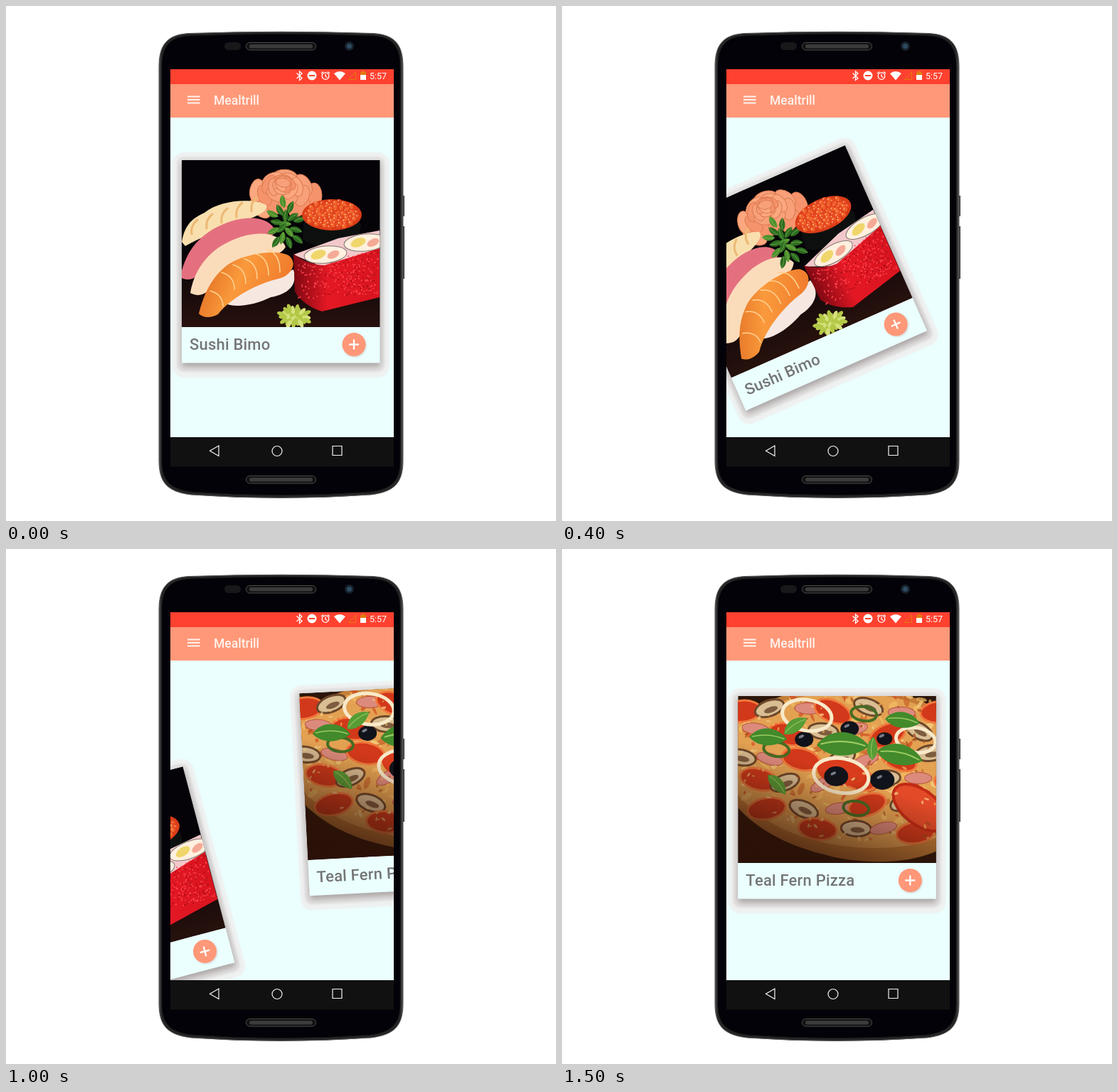
Recreate the animation shown at these times as an HTML page. Size 773 by 725 pixels, loop 2500 ms.

```html
<!DOCTYPE html>
<html lang="en">
<head>
<meta charset="utf-8">
<title>Meal cards</title>
<style>
  html, body { margin: 0; width: 100%; height: 100%; overflow: hidden; background: #fff; }
  body > svg { display: block; width: 100%; height: 100%; }
  text { font-family: Roboto, sans-serif; font-weight: 500; }
  .name { font-size: 22px; letter-spacing: .2px; fill: #757575; }
</style>
</head>
<body>
<svg viewBox="0 0 773 725">
  <defs>
    <linearGradient id="rim">
      <stop offset="0" stop-color="#4a4a4a"/><stop offset=".012" stop-color="#252525"/>
      <stop offset=".988" stop-color="#252525"/><stop offset="1" stop-color="#505050"/>
    </linearGradient>
    <linearGradient id="table" x2="0" y2="1">
      <stop offset=".5" stop-color="#050308"/><stop offset="1" stop-color="#27110d"/>
    </linearGradient>
    <linearGradient id="salmon" x2="1" y2=".3">
      <stop offset="0" stop-color="#d9601c"/><stop offset=".5" stop-color="#fa9a3c"/><stop offset="1" stop-color="#f07a2c"/>
    </linearGradient>
    <linearGradient id="roll">
      <stop offset="0" stop-color="#7c0812"/><stop offset=".4" stop-color="#e41824"/><stop offset="1" stop-color="#d8141f"/>
    </linearGradient>
    <linearGradient id="shade" x1=".6" y1=".5" x2=".4" y2="1">
      <stop offset="0" stop-color="#2a1006" stop-opacity="0"/><stop offset="1" stop-color="#2a1006" stop-opacity=".75"/>
    </linearGradient>
    <filter id="soft" x="-20%" y="-20%" width="140%" height="140%"><feGaussianBlur stdDeviation="4"/></filter>
    <filter id="edge"><feGaussianBlur stdDeviation="1"/></filter>
    <clipPath id="screen"><path d="M231 157H545V607H231Z"/></clipPath>
    <g id="base">
      <rect x="-13" y="-11" width="305" height="317" rx="16" fill="#eff0f0" filter="url(#edge)"/>
      <rect x="-7" y="-5" width="292" height="303" rx="10" fill="#e4e2e2" filter="url(#edge)"/>
      <rect y="4" width="279" height="287" fill="#8c8484" opacity=".65" filter="url(#soft)"/>
      <rect width="278.500" height="285.500" fill="#ebffff"/>
      <circle cx="243" cy="261" r="16.500" fill="#c9bdba" opacity=".6" filter="url(#edge)"/>
      <circle cx="242" cy="259.500" r="16.500" fill="#ff9878"/>
      <path d="M235 259.500H249M242 252.500V266.500" stroke="#fff" stroke-width="2.300"/>
    </g>
    <g id="speaker">
      <rect x="337.500" y="51.500" width="98" height="10.500" rx="5" fill="#111" stroke="#4c4c4c"/>
      <rect x="342" y="54" width="89" height="5.500" rx="2.700" fill="#3b3b3b"/>
    </g>
    <path id="leaf" d="M-20 2C-12 -12 8 -14 21 0C8 11 -10 12 -20 2Z"/>
    <path id="slice" d="M2 85C10 40 40 15 80 4C110 -3 130 5 136 20C125 40 90 32 52 60C30 78 22 95 2 85Z"/>
  </defs>

  <path d="M556 267H560V296H556ZM556 310H560V384H556Z" fill="#3c3c3c"/>
  <path d="M215 85C215 53 228 40 258 38.500Q386 34 515 38.500C545 40 558 53 558 85V640C558 672 545 684 513 688Q386 697 260 688C228 684 215 672 215 640Z" fill="url(#rim)" stroke="#5d5d5d"/>
  <path d="M219 86C219 56 231 43 259 42Q386 37 514 42C542 43 554 56 554 86V639C554 669 542 680 512 684Q386 693 261 684C231 680 219 669 219 639Z" fill="#030208" stroke="#111"/>
  <use href="#speaker"/><use href="#speaker" y="610"/>
  <rect x="307" y="51" width="23" height="11" rx="5.500" fill="#18181b"/>
  <circle cx="482.500" cy="56.500" r="6.500" fill="#18222c"/><circle cx="482.500" cy="56.500" r="3.500" fill="#2d4c61"/>

  <path d="M231 157H545V607H231Z" fill="#ebffff"/>
  <g clip-path="url(#screen)">
    <g id="sushi">
      <use href="#base"/>
      <svg width="278.500" height="235">
        <path d="M0 0H279V235H0Z" fill="url(#table)"/>
        <g id="ginger"></g>
        <path d="M0 115C4 92 14 82 32 74C52 57 97 52 119 63C125 80 60 90 5 121Z" fill="#f9dfae"/>
        <g id="shrimp"></g>
        <use href="#slice" x="-4" y="80" fill="#e4707f"/>
        <use href="#slice" x="10" y="102" fill="#fbdcba"/>
        <path d="M64 198C89 180 137 161 157 154C164 176 149 189 125 193C105 203 80 208 64 203Z" fill="#f6e7e0"/>
        <path d="M24 216C30 193 39 169 60 151C82 132 132 125 150 134C164 145 154 161 139 166C105 174 70 193 51 217C40 223 30 222 24 216Z" fill="url(#salmon)"/>
        <g id="stripes"></g>
        <g id="parsley"></g>
        <path d="M171 91C176 75 246 71 252 92L247 116C222 128 187 123 170 112Z" fill="#0d100f"/>
        <ellipse cx="211" cy="77" rx="42" ry="22" fill="#d93c18"/>
        <g id="roe"></g>
        <path d="M157 133L220 110L278 99V128L203 153Z" fill="#f2c8cb"/>
        <path d="M157 132Q179 148 201 148L278 124V193L197 213C180 208 166 197 159 185Z" fill="url(#roll)"/>
        <g id="beads"></g>
        <g id="filling"></g>
        <g id="wasabi"></g>
      </svg>
      <text class="name" x="11" y="267">Sushi Bimo</text>
    </g>

    <g id="pizza">
      <use href="#base"/>
      <svg width="278.500" height="235">
        <path d="M0 0H279V235H0Z" fill="#2c160b"/>
        <path d="M0 30Q60 -12 150 -12T279 20V218C240 237 170 238 117 222C58 207 20 180 0 157Z" fill="#c47e38"/>
        <path d="M0 36Q60 -4 150 -4T279 28V199C234 219 158 217 112 204C61 192 22 166 0 139Z" fill="#e3a152"/>
        <g id="toppings"></g>
        <path d="M0 0H279V235H0Z" fill="url(#shade)"/>
      </svg>
      <text class="name" x="11" y="267">Teal Fern Pizza</text>
    </g>
  </g>

  <path d="M231 89H545V110H231Z" fill="#ff412f"/>
  <path d="M231 110H545V157H231Z" fill="#ff9878"/>
  <path d="M255 127.500H272.500M255 132H272.500M255 136.500H272.500" stroke="#fff4ee" stroke-width="2"/>
  <text x="292" y="138.500" font-size="17.500" fill="#fff4ee">Mealtrill</text>
  <g fill="none" stroke="#fff" stroke-width="1.300">
    <path d="M408.500 94.500L416 101.500L412.500 104.500V92L416 95L408.500 102"/>
    <circle cx="449" cy="98.500" r="4.800"/><path d="M449 95.500V99L451.500 100.500M443 95L446 92.500M455 95L452 92.500"/>
  </g>
  <circle cx="430" cy="98" r="6.500" fill="#fff"/><path d="M426 98H434" stroke="#ff412f" stroke-width="2"/>
  <path d="M461 95Q469 89 477 95L469 104.500Z" fill="#fff"/>
  <path d="M481.500 103.500L491.500 93V103.500Z" fill="none" stroke="#e27a10"/>
  <path d="M498 93H500V91.500H504V93H506V98H498Z" fill="#e27a10"/><path d="M498 97H506V104H498Z" fill="#fff"/>
  <text x="511" y="103" font-size="12.500" fill="#fff" style="font-weight:400">5:57</text>

  <path d="M231 607H545V648.500H231Z" fill="#111"/>
  <g fill="none" stroke="#f4f4f4" stroke-width="1.200">
    <path d="M299 619V633.500L286.500 626.200ZM459 619.500H472V632.500H459Z"/><circle cx="381" cy="626.500" r="7"/>
  </g>
</svg>
<script>
const $ = id => document.getElementById(id);

let seed = 7;
const rand = (low = 0, high = 1) => low + (high - low) * (seed = seed * 16807 % 2147483647) / 2147483647;

function add(parent, tag, attrs) {
  const node = document.createElementNS('http://www.w3.org/2000/svg', tag);
  for (const k in attrs) node.setAttribute(k, attrs[k]);
  parent.append(node);
}

function oval(parent, cx, cy, rx, ry, angle, fill, line = {}) {
  add(parent, 'ellipse', { cx, cy, rx, ry, fill, transform: `rotate(${angle} ${cx} ${cy})`, ...line });
}

function curve(parent, d, stroke, width) {
  add(parent, 'path', { d, stroke, fill: 'none', 'stroke-width': width, 'stroke-linecap': 'round' });
}

function leaf(parent, x, y, scale, angle, fill) {
  const transform = `translate(${x} ${y}) rotate(${angle}) scale(${scale})`;
  add(parent, 'use', { href: '#leaf', transform, fill });
  add(parent, 'path', { d: 'M-17 1Q0 -5 18 0', transform, fill: 'none', stroke: '#9bca62', 'stroke-width': 1.2 });
}

// Calls place(x, y, angle, i) for n points of a sunflower spiral
function spiral(n, cx, cy, rx, ry, place) {
  for (let i = 0; i < n; i++) {
    const a = i * 2.4, r = Math.sqrt(i / n);
    place(cx + rx * r * Math.cos(a), cy + ry * r * Math.sin(a), a * 57.3, i);
  }
}

function drawSushi() {
  // Petals run from the outside in
  for (let i = 0; i < 24; i++) {
    const k = 1 - i / 24, a = i * 2.4;
    oval($('ginger'), 142 + 44 * k * Math.cos(a), 32 + 18 * k + 27 * k * Math.sin(a), 10 + 8 * k, 6 + 5 * k,
      a * 57.3 + 90, ['#f5946c', '#fba77f', '#f7a07a'][i % 3], { stroke: '#dc7a50' });
  }
  for (let i = 0; i < 5; i++) {
    const x = 14 + 21 * i, y = 104 - 8 * i;
    curve($('shrimp'), `M${x} ${y}q-2 -12 8 -20`, '#ecb873', 3);
  }
  for (let i = 0; i < 6; i++) {
    const x = 40 + 16 * i, y = 184 - 26 * Math.sqrt(i);
    curve($('stripes'), `M${x} ${y}q18 5 18 ${22 + i * 2}`, '#ffd08e', 1.6);
  }
  spiral(17, 145, 90, 24, 34, (x, y, a, i) => leaf($('parsley'), x, y, .45, a, i % 3 ? '#2c6c20' : '#4c902d'));
  spiral(80, 211, 76, 38, 19, (x, y, a, i) => {
    oval($('roe'), x, y, 3.2, 3.2, 0, i % 2 ? '#f06129' : '#e54820');
    oval($('roe'), x - 1, y - 1, .9, .9, 0, '#ffc29b');
  });
  for (let i = 0; i < 300; i++) {
    const k = rand(), y = 148 - 22 * k + rand(0, 50 + 12 * k);
    oval($('beads'), 164 + 112 * k, y, 1, 1, 0, i % 3 ? '#ff4650' : '#a80d18');
  }
  for (const [x, y] of [[202, 133], [258, 116]]) {
    oval($('filling'), x, y, 30, 12, -6, '#fff0df', { stroke: '#817570' });
    oval($('filling'), x - 10, y, 11, 6, -20, '#f0d66a');
    oval($('filling'), x + 11, y, 9, 5, -25, '#f5aa96');
  }
  spiral(30, 158, 220, 21, 13, (x, y, a, i) => oval($('wasabi'), x, y, 6, 3, a, i % 3 ? '#b4c847' : '#d5e17c'));
}

function drawPizza() {
  const g = $('toppings');
  const onPizza = (x, y) => y < Math.min(203, 140 + x * .5) && y > 22 - x * .3;
  const crumbs = (n, colors, size) => {
    for (let i = 0; i < n; i++) {
      const x = rand(0, 279), y = rand(0, 205);
      if (onPizza(x, y)) oval(g, x, y, rand(1, size), rand(1, size / 2), rand(0, 180), colors[i % colors.length], { opacity: .7 });
    }
  };
  const toppings = [
    (x, y, a) => oval(g, x, y, 27, 15, a, '#d2381a', { stroke: '#f0783c', 'stroke-width': 3 }),
    (x, y, a) => {
      oval(g, x, y, 21, 11, a, '#d9be94', { stroke: '#6d482b', 'stroke-width': 3 });
      oval(g, x + 2, y + 2, 10, 4, a, '#7d5c3f');
    },
    (x, y, a) => oval(g, x, y, 19, 8, a, '#dc8a7c', { stroke: '#b8543f' })
  ];

  crumbs(260, ['#f8d689', '#c9652a', '#f3bf65', '#d24a20'], 9);
  for (let row = 0; row < 6; row++)
    for (let col = 0; col < 7; col++) {
      const x = col * 46 + row % 2 * 23 + rand(-8, 8), y = 18 + row * 34 + rand(-6, 6);
      if (onPizza(x, y)) toppings[(col + 2 * row) % 3](x, y, rand(-30, 30));
    }
  oval(g, 256, 157, 44, 24, 38, '#e24a28', { stroke: '#c12a14', 'stroke-width': 4 });
  oval(g, 145, 106, 34, 20, 10, '#d93c1c');
  crumbs(160, ['#f6d28a', '#a54a1c', '#f0b45c'], 4);

  for (const [x, y] of [[177, 25], [54, 75], [166, 158]])
    oval(g, x, y, 18, 10, 8, 'none', { stroke: '#456c23', 'stroke-width': 4 });
  for (const [x, y, r] of [[93, 61, 13], [138, 113, 17], [203, 118, 17], [206, 60, 11], [157, 46, 13]]) {
    oval(g, x, y, r, r * .82, 0, '#11131a');
    oval(g, x - 4, y - 4, 4, 2, -25, '#777a88');
  }
  for (const [x, y, r] of [[97, 27, 35], [145, 112, 39], [250, 62, 28]])
    oval(g, x, y, r, r * .62, 10, 'none', { stroke: '#f8e9c9', 'stroke-width': 5 });
  for (const [x, y, s, a] of [[42, 58, 1.3, 6], [80, 42, .95, -32], [147, 68, 1.8, 4],
    [227, 83, 1.6, 14], [189, 74, .8, -85], [231, 34, 1.2, 10], [55, 124, .9, 50]])
    leaf(g, x, y, s, a, s > 1 ? '#428a2b' : '#579c35');
}

// Smooth curve through keys [time, ...values], at rest at both ends
function follow(keys, t) {
  const last = keys.length - 1;
  if (t <= keys[0][0]) return keys[0];
  if (t >= keys[last][0]) return keys[last];
  const i = keys.findIndex(k => k[0] > t) - 1;
  const p = keys[i], q = keys[i + 1], span = q[0] - p[0], u = (t - p[0]) / span;
  const slope = (j, c) => j > 0 && j < last
    ? (keys[j + 1][c] - keys[j - 1][c]) / (keys[j + 1][0] - keys[j - 1][0]) * span : 0;
  const s = u * u * (3 - 2 * u);
  return p.map((v, c) => v + (q[c] - v) * s
    + slope(i, c) * u * (1 - u) ** 2 - slope(i + 1, c) * u * u * (1 - u));
}

function place(id, x, y, angle) {
  $(id).setAttribute('transform', `translate(${x} ${y}) rotate(${angle}) translate(-139 -142.7)`);
}

// Time, centre x, centre y, angle
const swipe = [[0, 386, 359.7, 0], [300, 356.5, 364, -24], [600, 256.4, 432.2, -17.5], [800, 203.4, 457.6, -19],
  [1000, 150.1, 479.8, -14.8], [1200, 118.7, 510, -7], [1500, 50, 570, 0]];
// Time, distance from rest
const enter = [[800, 324], [1000, 172], [1200, 87], [1500, 0]];

function draw() {
  const t = Math.floor(performance.now() % 2500 / 100) * 100;
  const [, x, y, angle] = follow(swipe, t);
  const [, far] = follow(enter, t);
  place('sushi', x, y, angle);
  place('pizza', 386.3 + far, 349.7 - far * .065, -far / 58);
  requestAnimationFrame(draw);
}

drawSushi();
drawPizza();
draw();
</script>
</body>
</html>
```
